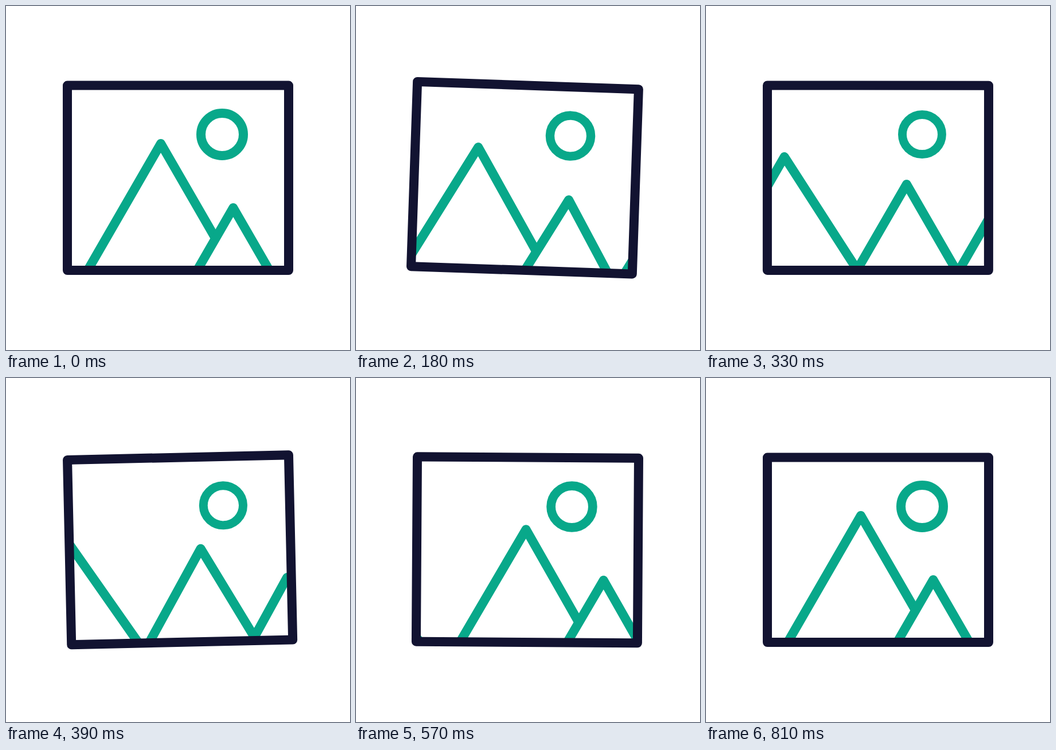
An HTML page that plays this animation: 600 px wide and 600 px high, repeating every 2870 ms.

```html
<!DOCTYPE html>
<html lang="en">
<head>
<meta charset="utf-8">
<title>Swinging picture</title>
<style>
  html, body { margin: 0; width: 100%; height: 100%; overflow: hidden; background: #fff; }
  svg { display: block; width: 100vw; height: 100vh; }
  path, circle, rect { stroke-width: 16; stroke-linejoin: round; }
  .green { stroke: #08a88a; fill: #fff; }
</style>
</head>
<body>
<svg viewBox="0 0 600 600">
  <clipPath id="pane"><rect x="106" y="138" width="388" height="323"/></clipPath>
  <g id="picture">
    <g clip-path="url(#pane)">
      <path id="far" class="green"/>
      <path id="middle" class="green"/>
      <path id="near" class="green"/>
    </g>
    <circle id="sun" class="green" r="37"/>
    <rect x="107" y="138.6" width="386" height="322.4" fill="none" stroke="#121331"/>
  </g>
</svg>
<script>
const LOOP = 2870, STEP = 30, LAST = 27;
const FLOOR = 490, GROUND = 461, SLOPE = Math.tan(Math.PI / 6);

// Keys are [step, value].
const swing = curve([[0, 0], [4, 1.37], [6.4, 2], [8, 1.78], [11, 0.02],
  [13.2, -1.3], [15, -0.75], [18, 0.2], [20, 0.45], [27, 0]]);
const travel = curve([[0, 0], [4, 0.08], [8, 0.227], [11, 0.367],
  [15, 0.589], [19, 0.784], [27, 1]]);
const sunSize = curve([[0, 1], [4, 0.978], [8, 0.945], [11.5, 0.932],
  [15, 0.945], [19, 0.983], [27, 1]]);

// Monotone cubic through the keys, flat at both ends and at every turn.
function curve(keys) {
  const rise = i => (keys[i + 1][1] - keys[i][1]) / (keys[i + 1][0] - keys[i][0]);
  const slopes = keys.map((_, i) => {
    if (i === 0 || i === keys.length - 1) return 0;
    const a = rise(i - 1), b = rise(i);
    return a * b > 0 ? 2 * a * b / (a + b) : 0;
  });
  return x => {
    let i = 0;
    while (i < keys.length - 2 && x > keys[i + 1][0]) i++;
    const [x0, y0] = keys[i], [x1, y1] = keys[i + 1];
    const w = x1 - x0, u = (x - x0) / w, v = 1 - u;
    return y0 * (1 + 2 * u) * v * v + y1 * u * u * (3 - 2 * u)
      + w * u * v * (slopes[i] * v - slopes[i + 1] * u);
  };
}

const el = id => document.getElementById(id);
const mix = (a, b, p) => a + (b - a) * p;

function mountain(id, x, y, right = SLOPE) {
  const h = FLOOR - y;
  el(id).setAttribute('d', `M${x - SLOPE * h} ${FLOOR}L${x} ${y}L${x + right * h} ${FLOOR}`);
}

function draw(time) {
  const step = Math.min(LAST, Math.floor((time % LOOP) / STEP));
  const p = travel(step);
  el('picture').setAttribute('transform', `rotate(${swing(step)} 300 138.6)`);
  el('sun').setAttribute('transform', `translate(377 224) scale(${sunSize(step)})`);

  // The far peak sinks while its right foot keeps the same distance.
  const farY = mix(240, 303, p);
  mountain('far', mix(270, -93, p), farY, SLOPE * (GROUND - 240) / (GROUND - farY));
  mountain('middle', mix(396.3, 270, p), mix(352, 240, p));
  mountain('near', mix(567, 396.3, p), 352);
}

const start = performance.now();
function tick() {
  draw(performance.now() - start);
  requestAnimationFrame(tick);
}
tick();
</script>
</body>
</html>
```
